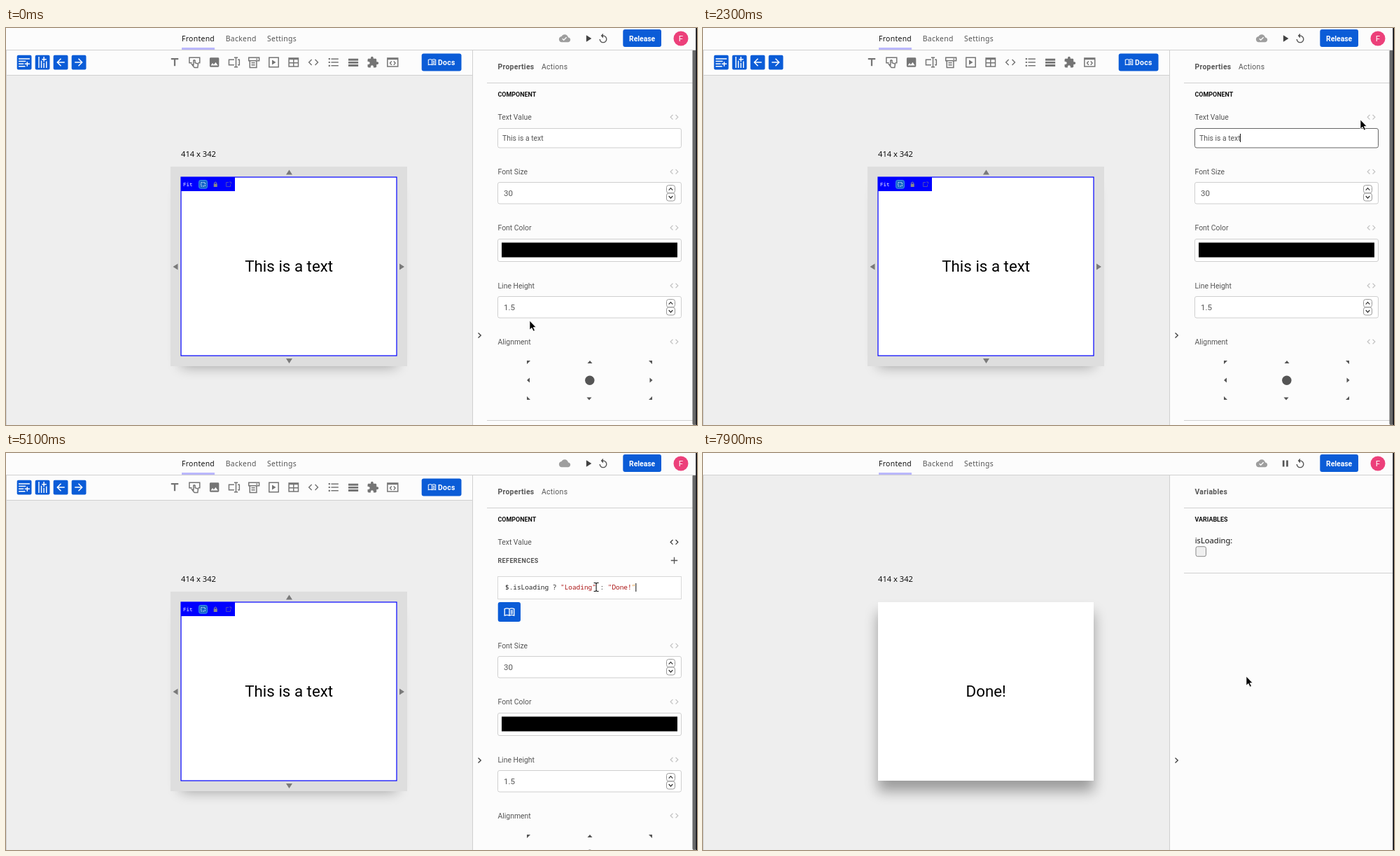
Write an HTML page that moves like this. It is 987x567 px and loops after 8 s.

```html
<!DOCTYPE html>
<html lang="en">
<head>
<meta charset="utf-8">
<title>Text component editor</title>
<style>
html, body { margin: 0; width: 100%; height: 100%; overflow: hidden; background: #fcfcfc; }
svg { display: block; width: 987px; height: 567px; }
text { white-space: pre; font-family: Roboto, sans-serif; font-size: 10.42px; fill: #555; }
.noto { font-family: "Noto Sans", sans-serif; }
.size { font-size: 11.16px; fill: #111; }
.tab { letter-spacing: .3px; }
.bold { font-weight: 700; }
.medium { font-weight: 500; }
.head { font-weight: 700; font-size: 8.93px; fill: #111; }
.num { font-size: 11.5px; }
.mono { font-family: "Noto Sans Mono", monospace; font-size: 9.42px; fill: #222; }
.str { fill: #a11; }
.match { fill: #e08a1e; }
.white { fill: #fff; }
.line { stroke: #d0d0d0; fill: none; }
.ico { fill: none; stroke: currentColor; stroke-width: 2; }
.solid { fill: currentColor; }
.box { fill: #fff; stroke: #cfcfcf; }
.box.on { stroke: #666; }
</style>
</head>
<body>
<svg id="stage" viewBox="0 0 987 567"></svg>
<script>
const BLUE = '#0b5cd7';
const LOOP = 8000;

const PATHS = {
  cloud: 'M19.35 10.04C18.67 6.59 15.64 4 12 4 9.11 4 6.6 5.64 5.35 8.04 2.34 8.36 0 10.91 0 14c0 3.31 2.69 6 6 6h13c2.76 0 5-2.24 5-5 0-2.64-2.05-4.78-4.65-4.96z',
  check: 'M10 17l-3.5-3.5 1.41-1.41L10 14.17 15.18 9l1.41 1.41L10 17z',
  play: 'M8 5v14l11-7z',
  pause: 'M6 19h4V5H6zM14 5v14h4V5z',
  replay: 'M12 5V1L7 6l5 5V7c3.31 0 6 2.69 6 6s-2.69 6-6 6-6-2.69-6-6H4c0 4.42 3.58 8 8 8s8-3.58 8-8-3.58-8-8-8z',
  addRow: 'M15 9H1v2h14zM23 4H1v2h22zM19 14v-3h-2v3h-4v2h4v4h2v-4h4v-2zM1 14h10v2H1zM1 19h13v2H1z',
  back: 'M20 11H7.83l5.59-5.59L12 4l-8 8 8 8 1.41-1.41L7.83 13H20z',
  title: 'M5 4v3h5.5v12h3V7H19V4z',
  image: 'M21 19V5c0-1.1-.9-2-2-2H5c-1.1 0-2 .9-2 2v14c0 1.1.9 2 2 2h14c1.1 0 2-.9 2-2zM8.5 13.5l2.5 3.01L14.5 12l4.5 6H5l3.5-4.5z',
  code: 'M9.4 16.6L4.8 12l4.6-4.6L8 6l-6 6 6 6zM14.6 16.6l4.6-4.6-4.6-4.6L16 6l6 6-6 6z',
  list: 'M3 4h3v3H3zM8 4.5h14v2H8zM3 10.5h3v3H3zM8 11h14v2H8zM3 17h3v3H3zM8 17.5h14v2H8z',
  rows: 'M3 5h19v4H3zM3 10.5h19v4H3zM3 16h19v4H3z',
  puzzle: 'M20.5 11H19V7c0-1.1-.9-2-2-2h-4V3.5C13 2.12 11.88 1 10.5 1S8 2.12 8 3.5V5H4c-1.1 0-2 .9-2 2v3.8h1.5c1.49 0 2.7 1.21 2.7 2.7s-1.21 2.7-2.7 2.7H2V20c0 1.1.9 2 2 2h3.8v-1.5c0-1.49 1.21-2.7 2.7-2.7s2.7 1.21 2.7 2.7V22H17c1.1 0 2-.9 2-2v-4h1.5a2.5 2.5 0 0 0 0-5z'
};

// Stroked icons on the same 24 unit grid
const LINES = {
  button: 'M7 13H2V3h20v10h-3M10 20l-3-4 3 1V8.500q1.500-1.500 3 0V13l6 2-1 7h-6z',
  input: 'M12 7H2v10h10M19 7h3v10h-3M15.500 3v18M12 3h7M12 21h7',
  form: 'M2 3h20v6H2zM4 9v13h13V9M7 13h7M7 17h7M16 6h3',
  video: 'M3 3h18v18H3z',
  table: 'M3 4h18v16H3zM3 6h18M3 13h18M12 6v14',
  page: 'M2 4h20v16H2zM2 6h20M10 10l-3 3.500 3 3.500M14 10l3 3.500-3 3.500',
  book: 'M2 5q5-2 10 0v14q-5-2-10 0zM12 5q5-2 10 0v14q-5-2-10 0M14.500 9q2.500-1 5-.5M14.500 12q2.500-1 5-.5M14.500 15q2.500-1 5-.5'
};

const place = (x, y, s, turn = 0) =>
  `transform="translate(${x} ${y}) rotate(${turn}) scale(${s}) translate(-12 -12)"`;
const icon = (name, x, y, s = .744, color = '#757575', turn = 0) =>
  `<path d="${PATHS[name] || LINES[name]}" class="${PATHS[name] ? 'solid' : 'ico'}" color="${color}" fill-rule="evenodd" ${place(x, y, s, turn)}/>`;
const text = (x, y, s, cls = '', extra = '') => `<text x="${x}" y="${y}" class="${cls}" ${extra}>${s}</text>`;
const rect = (x, y, w, h, fill, rx = 0, extra = '') =>
  `<rect x="${x}" y="${y}" width="${w}" height="${h}" fill="${fill}" rx="${rx}" ${extra}/>`;
const line = d => `<path d="${d}" class="line"/>`;
const shape = (d, fill) => `<path d="${d}" fill="${fill}"/>`;
const group = (id, body) => `<g id="${id}">${body}</g>`;
const field = (id, y, h) => `<rect id="${id}" class="box" x="702.5" y="${y}" width="262" height="${h}" rx="2.5"/>`;
const label = (s, y) => text(702.5, y + 3.7, s) + icon('code', 954.5, y, .62, '#c4c4c4');

function stepper(y) {
  const key = (cy, dir) => rect(943.5, cy - 5.5, 12, 11, '#fff', 3, 'stroke="#999"') +
    `<path d="M946.700 ${cy + dir * 1.5}l2.800 ${-dir * 3}l2.800 ${dir * 3}" fill="none" stroke="#333" stroke-width="1.200"/>`;
  return key(y - 5.7, 1) + key(y + 5.7, -1);
}

function topBar() {
  return rect(0, 0, 987, 31, '#fcfcfc') + line('M0 31.500H985') +
    text(251, 18.7, 'Frontend', 'noto tab', 'style="fill:#111"') +
    text(313.7, 18.7, 'Backend', 'noto tab') + text(373, 18.7, 'Settings', 'noto tab') +
    rect(251, 28, 47, 3, '#bab7fb') +
    icon('cloud', 798, 14.8, .68, '#9e9e9e') + group('saved', icon('check', 798, 14.8, .68, '#fcfcfc')) +
    group('hover', rect(821.5, 4.5, 20.5, 20.5, '#ebebeb', 3)) +
    group('playIcon', icon('play', 831.6, 15, .68, '#424242')) +
    group('pauseIcon', icon('pause', 831.8, 15, .66, '#555')) +
    icon('replay', 853, 15.2, .68, '#555') +
    rect(881.3, 2, 54.7, 25, BLUE, 3) + text(890, 18.7, 'Release', 'bold white') +
    '<circle cx="964" cy="15" r="10.500" fill="#ec407a"/>' +
    text(964, 19, 'F', 'white', 'text-anchor="middle" style="font-size:11.500px"');
}

function toolBar() {
  const tools = ['title', 'button', 'image', 'input', 'form', 'video', 'table', 'code', 'list', 'rows', 'puzzle', 'page'];
  const squares = [['addRow', 0], ['addRow', -90], ['back', 0], ['back', 180]];
  return rect(1, 32, 665, 35, '#fcfcfc') + line('M0 67.500H666') +
    squares.map(([name, turn], i) => rect(15.7 + 26 * i, 38.7, 20.8, 20.8, BLUE, 2) +
      icon(name, 26 + 26 * i, 49, .72, '#fff', turn)).join('') +
    tools.map((name, i) => icon(name, 241 + 28.3 * i, 49)).join('') +
    shape('M380 45.500v7l5.500-3.500z', '#757575') +
    rect(593.7, 36.5, 56.8, 25, BLUE, 3) + icon('book', 608.5, 49, .52, '#fff') +
    text(617, 52.7, 'Docs', 'bold white tab');
}

function canvasArea() {
  const gray = '#7a7a7a';
  const frame = rect(235, 198, 338, 285, '#dedede') +
    shape('M400 209.500h9l-4.500-7zM400 472h9l-4.500 7zM245.500 336.500v9l-7-4.500zM562 336.500v9l7-4.500z', gray);
  const marks = rect(250, 213, 308, 255, 'none', 0, 'stroke="#0000ff" stroke-width="1.200"') +
    rect(250, 213, 77, 20, '#0000ff') + text(253, 226, 'Fit', 'mono white', 'style="font-size:7.500px"') +
    rect(275.7, 217.5, 11.6, 11.6, '#1565c8', 2, 'stroke="#3f9be8"') +
    rect(278.7, 220.7, 5.6, 5.2, 'none', 0, 'stroke="#cfe6ff" stroke-dasharray="2 1"') +
    rect(296.7, 222.5, 5, 4.5, '#8a8a8a') +
    '<path d="M297.700 222.500v-1.500q1.500-2 3 0v1.500" fill="none" stroke="#8a8a8a"/>' +
    '<path d="M318 220.500h-3.500v6h6v-3M319 220h2.500v2.500" fill="none" stroke="#4a4ab8"/>';
  return rect(0, 32, 666, 535, '#eeeeee') + line('M.5 32V567') +
    text(250, 183.6, '414 x 342', 'noto size') +
    rect(250, 228, 308, 255, '#000', 0, 'opacity=".35" filter="url(#soft)"') +
    group('frame', frame) + rect(250, 213, 308, 255, '#fff') + group('marks', marks) +
    text(404.2, 348.4, '', '', 'id="result" text-anchor="middle" style="font-size:22.350px;fill:#000"');
}

function alignment() {
  const d = 'M744 475h5l-5 5zM923 475h-5l5 5zM744 531h5l-5-5zM923 531h-5l5-5z' +
    'M830.500 479h7l-3.500-4zM829.500 527.500h7l-3.500 4zM748 499.500v7l-4-3.500zM919.500 499.500v7l4-3.500z';
  return shape(d, '#555') + '<circle cx="833.800" cy="503.300" r="6.700" fill="#555"/>';
}

function properties() {
  const plain = field('textBox', 143.5, 27.5) + text(709, 161, 'This is a text') +
    group('inputCaret', rect(767, 151, 1, 12, '#111'));
  const editor = icon('code', 954.5, 127.3, .62, '#333') +
    text(702.5, 156.7, 'REFERENCES', 'head', 'style="fill:#555;letter-spacing:.43px"') +
    '<path d="M949.800 153.500h9.400M954.500 148.800v9.400" stroke="#555" stroke-width="1.300"/>' +
    rect(702.5, 176.5, 262, 32, '#fff', 0, 'stroke="#d8d8d8"') +
    group('selection', rect(713, 186, 130, 12, '#bfdce8')) +
    text(713, 195.3, '', 'mono', 'id="code"') + group('codeCaret', rect(0, 186, 1, 12, '#111')) +
    rect(702.7, 213, 32.3, 28, BLUE, 3) + icon('book', 719, 227.3, .68, '#fff');
  const rest = label('Font Size', 205.2) + field('sizeBox', 220.5, 30.5) + text(711, 240, '30', 'num') + stepper(235.8) +
    label('Font Color', 285.2) + field('colorBox', 301.5, 32) + rect(708, 306.5, 251, 21, '#000') +
    label('Line Height', 368) + field('lineBox', 383.5, 30.5) + text(711, 403, '1.5', 'num') + stepper(398.8) +
    label('Alignment', 448) + alignment() + line('M687 560.500H981');
  return text(702.5, 58.7, 'Properties', 'bold tab') + text(765, 58.7, 'Actions', 'tab') +
    line('M687 78.500H981') + text(702.5, 97.8, 'COMPONENT', 'head') + text(702.5, 131.2, 'Text Value') +
    group('plain', icon('code', 954.5, 127.3, .62, '#c4c4c4') + plain) +
    group('editor', editor) + group('rest', rest) + rect(980.5, 31, 5, 536, '#686868', 2);
}

function variables() {
  return text(702.5, 58.7, 'Variables', 'bold tab') + line('M687 78.500H985M687 171.500H985') +
    text(702.5, 97.8, 'VARIABLES', 'head') + text(702.7, 128.8, 'isLoading:', 'noto size') +
    rect(704, 133.7, 14.5, 14, '#efefef', 2.5, 'stroke="#8a8a8a"');
}

function pointers() {
  const outline = 'stroke-linejoin="round"';
  return group('cursor',
    `<path id="arrow" d="M0 0V13L3 10.300 5.300 15 7.400 14 5.200 9.500H9Z" fill="#000" stroke="#fff" stroke-width=".7" ${outline}/>` +
    '<path id="beam" d="M-3.500-6H-1L0-5 1-6H3.500M0-5V5M-3.500 6H-1L0 5 1 6H3.500" fill="none" stroke="#111" stroke-width="1.100"/>' +
    `<path id="hand" d="M-1 1.500Q0-.5 1.300 1.500V5Q3 4 4 5.500 5.500 4.800 6.300 6.300 8 6 8 7.500V10L6.500 13.500H0L-4 8.500Q-4 6.500-1 8Z" fill="#fff" stroke="#111" ${outline}/>`);
}

const stage = document.getElementById('stage');
stage.innerHTML =
  '<defs><filter id="soft" x="-20%" y="-20%" width="140%" height="140%"><feGaussianBlur stdDeviation="9.500"/></filter></defs>' +
  rect(0, 0, 987, 567, '#fcfcfc') + canvasArea() + group('tools', toolBar()) +
  rect(666, 32, 321, 535, '#fcfcfc') + line('M666.500 32V567') +
  group('props', properties()) + group('vars', variables()) +
  '<path d="M674.500 435.500l3.700 3.500-3.700 3.500" fill="none" stroke="#444" stroke-width="1.400"/>' +
  topBar() + rect(985.3, 0, 1.7, 567, '#0b0b10') +
  group('tip', rect(0, 0, 124, 29, '#2b2e33', 3) + text(5.7, 18.8, 'Type your text here', 'noto white', 'style="font-size:12.400px"')) +
  pointers();

const $ = id => document.getElementById(id);
const show = (id, on) => $(id).setAttribute('display', on ? 'inline' : 'none');
const move = (id, x, y) => $(id).setAttribute('transform', `translate(${x} ${y})`);
const within = (t, a, b) => t >= a && t < b;

// Pointer stops: time, x, y
const STOPS = [
  [0, 748, 418], [200, 748, 418], [1000, 757, 133], [1100, 758, 158], [1400, 758, 163],
  [2000, 758, 163], [2300, 939, 131], [2500, 955, 128], [2700, 955, 128], [3400, 841, 187],
  [3500, 841, 187], [3700, 843, 184], [5000, 843, 184], [5400, 843.3, 214], [6400, 843.3, 214],
  [7200, 831, 17.5], [7300, 831, 17.5], [7900, 776, 319], [8000, 776, 319]
];

function pointerAt(t) {
  const i = STOPS.findIndex((stop, n) => n && t <= stop[0]);
  const [t0, x0, y0] = STOPS[i - 1], [t1, x1, y1] = STOPS[i];
  const p = (t - t0) / (t1 - t0);
  const k = t1 - t0 > 400 ? p * p * (3 - 2 * p) : p;
  return [x0 + (x1 - x0) * k, y0 + (y1 - y0) * k];
}

const span = (cls, s) => `<tspan class="${cls}">${s}</tspan>`;

function codeText(t) {
  if (t < 5000) {
    const body = span('str', '&lt;p&gt;This is a text&lt;/p&gt;');
    const end = t < 4000 ? span('str', '"') : '';
    return span(t < 3700 ? 'str' : 'match', '"') + body + end;
  }
  return '$.isLoading ? ' + span('str', '"Loading"') + ' : ' + span('str', '"Done!') +
    span(t < 6100 ? 'match' : 'str', '"');
}

function draw(t) {
  const coding = t >= 2800, running = t >= 7400;
  const [x, y] = pointerAt(t);
  const inPanel = x > 702 && x < 965 && !running;
  const over = (top, height) => inPanel && within(y, top, top + height);
  const shift = coding ? 70 : 0;

  show('tools', !running);
  show('frame', !running);
  show('marks', !running);
  show('props', !running);
  show('vars', running);
  show('playIcon', !running);
  show('pauseIcon', running);
  show('plain', !coding);
  show('editor', coding);
  move('rest', 0, shift);

  const onText = !coding && over(143, 28);
  const onSize = over(220 + shift, 31), onLine = over(383 + shift, 31);
  $('textBox').classList.toggle('on', onText || t >= 1900);
  $('sizeBox').classList.toggle('on', onSize);
  $('lineBox').classList.toggle('on', onLine);
  show('inputCaret', within(t, 1900, 2500));

  $('code').innerHTML = codeText(t);
  show('selection', within(t, 4000, 5000));
  show('codeCaret', within(t, 3700, 4000) || within(t, 5000, 6100));
  move('codeCaret', t < 5000 ? 843 : 899.3, 0);
  $('result').textContent = t < 5200 ? 'This is a text' : 'Done!';
  show('saved', !within(t, 2900, 3300) && !within(t, 5100, 5400));

  const onPlay = Math.abs(x - 831) < 10 && y < 26;
  const onToggle = Math.abs(x - 954) < 9 && Math.abs(y - 127) < 8;
  const hand = onPlay || (onToggle && t < 3400);
  const beam = !hand && (onText || onSize || onLine || (coding && over(176, 33)));
  show('hover', onPlay);
  show('hand', hand);
  show('beam', beam);
  show('arrow', !hand && !beam);
  move('cursor', x, y);

  show('tip', within(t, 1800, 1900) || within(t, 6000, 6500));
  move('tip', t < 3000 ? 758 : 843.3, t < 3000 ? 183 : 234);
}

function tick(now) {
  draw(Math.floor(now % LOOP / 100) * 100);
  requestAnimationFrame(tick);
}
draw(0);
requestAnimationFrame(tick);
</script>
</body>
</html>
```
